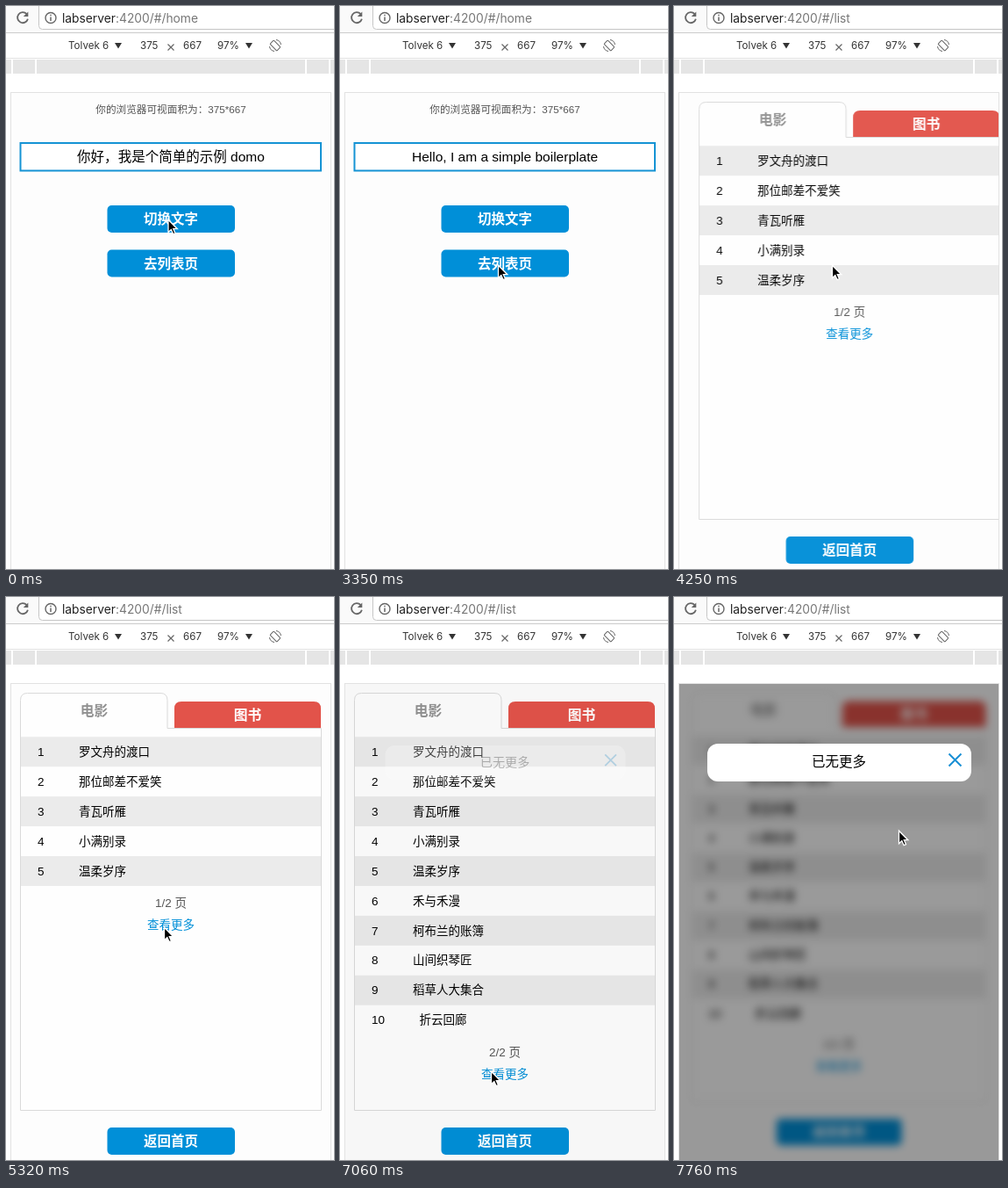
Recreate the animation shown at these times as an HTML page. Size 374 by 641 pixels, loop 8 s.

```html
<!DOCTYPE html>
<html lang="zh-CN">
<head>
<meta charset="utf-8">
<title>Page demo</title>
<style>
  html, body { margin: 0; width: 100%; height: 100%; overflow: hidden; background: #fff; }
  svg { display: block; width: 374px; height: 641px; }
  text { font-family: "Liberation Sans", "Noto Sans CJK SC", "Noto Sans CJK", sans-serif; white-space: pre; }
  .ui { font-family: Inter, Roboto, sans-serif; }
  .mid { text-anchor: middle; }
</style>
</head>
<body>
<svg viewBox="0 0 374 641">
  <defs>
    <clipPath id="view"><rect x="6" y="99" width="364" height="542"/></clipPath>
  </defs>

  <g id="chrome">
    <rect width="374" height="30" fill="#fafafa"/>
    <rect x="37.500" y="-8" width="360" height="34.500" rx="4" fill="#fff" stroke="#c6c6c6"/>
    <path d="M0 30.500H374" stroke="#ccc"/>
    <path d="M23.600 9.200A6 6 0 1 0 24.900 14.800" fill="none" stroke="#666" stroke-width="1.800"/>
    <path d="M25.300 6.500V12H19.800Z" fill="#666"/>
    <circle cx="51" cy="13.500" r="6" fill="none" stroke="#666" stroke-width="1.400"/>
    <path d="M51 12.500V17M51 9.800V11.300" stroke="#666" stroke-width="1.500"/>
    <text class="ui" x="64" y="18.500" font-size="13.800" fill="#222">labserver<tspan id="path" fill="#777"></tspan></text>
    <g font-size="11.600" fill="#333">
      <text class="ui" x="71" y="49">Tolvek 6</text>
      <text class="ui" x="153" y="49">375</text>
      <text class="ui" x="202" y="49">667</text>
      <text class="ui" x="241" y="49">97%</text>
      <path d="M124 42h8l-4 6.500zM273 42h8l-4 6.500z"/>
    </g>
    <path d="M184.500 43.500l7 7m0-7l-7 7" stroke="#666" stroke-width="1.200"/>
    <g fill="none" stroke="#666" transform="translate(307 45)">
      <rect x="-3" y="-5.500" width="6" height="11" rx="1" transform="rotate(-45)"/>
      <path d="M1-6.500A6.500 6.500 0 0 1 6.500-1M-1 6.500A6.500 6.500 0 0 1-6.500 1"/>
    </g>
    <path d="M0 59.500H374" stroke="#e2e2e2"/>
    <path d="M0 61h6v16h-6zM8 61h25v16h-25zM35 61h306v16h-306zM343 61h25v16h-25zM370 61h4v16h-4z" fill="#e5e5e5"/>
  </g>

  <rect x="5.500" y="98.500" width="365" height="560" fill="#fdfdfd" stroke="#e2e2e2"/>
  <g clip-path="url(#view)">
    <g id="home">
      <text class="mid" x="188" y="121.500" font-size="11.650" fill="#555">你的浏览器可视面积为&#xff1a;375*667</text>
      <rect x="16.500" y="156" width="342.500" height="31.500" fill="#fff" stroke="#1593d4" stroke-width="2"/>
      <text id="hello" class="mid" x="188" y="176.500" font-size="15.530"></text>
    </g>
    <g id="list">
      <path d="M16.500 584.500V117.500q0-8 8-8H176q8 0 8 8V149.500H359.500V584.500Z" fill="#fefefe" stroke="#dadada"/>
      <path d="M192 149V127q0-8 8-8H351q8 0 8 8V149Z" fill="#e2534a"/>
      <g class="mid" font-size="15.800" font-weight="700">
        <text x="100.500" y="135" fill="#919191">电影</text>
        <text x="275.500" y="140" fill="#fff">图书</text>
      </g>
      <g id="first"></g>
      <g id="more"></g>
      <g id="pager" class="mid" font-size="13.500">
        <text id="count" x="188" y="522.500" fill="#555"></text>
        <text x="188" y="548" fill="#008fd8">查看更多</text>
      </g>
    </g>
    <rect id="shade" x="6" y="99" width="364" height="542"/>
    <g id="modal">
      <rect x="38" y="167" width="301" height="43" rx="12" fill="#fff"/>
      <text class="mid" x="188" y="193" font-size="15.500">已无更多</text>
      <path d="M313.500 178.500l14 14m0-14l-14 14" stroke="#1a90d5" stroke-width="2"/>
    </g>
  </g>

  <g id="cursor">
    <path d="M.5.700V15.200l3.300-3.200 2.300 5.200 2.400-1-2.200-5H10.800Z" stroke="#fff" stroke-width="1.300"/>
  </g>
</svg>
<script>
const LOOP = 8000, PAGE_W = 365, ROW_H = 33.95;
const $ = id => document.getElementById(id);

function add(parent, tag, attrs, text = '') {
  const el = document.createElementNS('http://www.w3.org/2000/svg', tag);
  for (const key in attrs) el.setAttribute(key, attrs[key]);
  el.textContent = text;
  parent.append(el);
}

function button(parent, y, label) {
  add(parent, 'rect', { x: 115.5, y, width: 145.5, height: 31, rx: 5, fill: '#008fd8' });
  add(parent, 'text', { class: 'mid', x: 188, y: y + 21, 'font-size': 15.5, 'font-weight': 700, fill: '#fff' }, label);
}

button($('home'), 227, '切换文字');
button($('home'), 277.5, '去列表页');
button($('list'), 604, '返回首页');

const titles = ['罗文舟的渡口', '那位邮差不爱笑', '青瓦听雁', '小满别录', '温柔岁序',
  '禾与禾漫', '柯布兰的账簿', '山间织琴匠', '稻草人大集合', '折云回廊'];
titles.forEach((title, i) => {
  const group = $(i < 5 ? 'first' : 'more');
  const top = 159.2 + i * ROW_H;
  if (i % 2 === 0) add(group, 'rect', { x: 17, y: top, width: 342, height: ROW_H, fill: '#ebebeb' });
  const row = { y: top + 21.6, 'font-size': 13.5 };
  add(group, 'text', { ...row, x: 36 }, i + 1);
  add(group, 'text', { ...row, x: i < 9 ? 83 : 90.5 }, title);
});

// Number of held steps already shown, 0..n, between a and b.
function step(t, a, b, n) {
  if (t < a) return 0;
  return Math.min(n, 1 + Math.floor((t - a) / (b - a) * (n - 1) + 0.05));
}

// CSS "ease": cubic-bezier(.25, .1, .25, 1)
function ease(x) {
  if (x <= 0) return 0;
  if (x >= 1) return 1;
  const bez = (s, p, q) => 3 * s * (1 - s) ** 2 * p + 3 * s * s * (1 - s) * q + s ** 3;
  let lo = 0, hi = 1;
  for (let i = 0; i < 24; i++) {
    const m = (lo + hi) / 2;
    if (bez(m, 0.25, 0.25) < x) lo = m; else hi = m;
  }
  return bez(lo, 0.1, 1);
}

// start, end, steps, target x, target y, sideways bend
const moves = [
  [60, 120, 2, 187, 237.5, 0],
  [2990, 3350, 7, 180, 294.5, 0],
  [4900, 5320, 8, 180, 375.5, 0],
  [6160, 6640, 9, 172, 539.5, -13],
  [7590, 7760, 4, 256, 265.5, 0]
];

function cursorAt(t) {
  let x = 184.5, y = 242.5;
  for (const [a, b, n, tx, ty, bend] of moves) {
    const u = step(t, a, b, n) / n;
    const p = u * u * (3 - 2 * u);
    x += (tx - x) * p + bend * 4 * p * (1 - p);
    y += (ty - y) * p;
  }
  return `translate(${x} ${y})`;
}

// Modal entrance: shade, card opacity, card scale, blur, page scale
const entrance = [
  [0, 0, 0.9, 0, 1],
  [0.025, 0.25, 0.91, 0.2, 1],
  [0.085, 0.55, 0.94, 0.7, 0.999],
  [0.167, 0.8, 0.9635, 1.4, 0.997],
  [0.395, 1, 1, 5, 0.98]
];

const scaleAt = (x, y, s) => `translate(${x} ${y}) scale(${s}) translate(${-x} ${-y})`;

function draw(t) {
  const english = (t >= 480 && t < 1740) || t >= 2510;
  $('hello').textContent = english ? 'Hello, I am a simple boilerplate' : '你好\uff0c我是个简单的示例 domo';
  $('path').textContent = t < 3890 ? ':4200/#/home' : ':4200/#/list';

  const k = step(t, 3890, 4360, 9);
  const slide = k && ease((32 + (k - 1) * 58.75) / 500);
  $('home').setAttribute('transform', `translate(${-PAGE_W * slide} 0)`);
  $('home').setAttribute('opacity', (1 - slide) ** 2);

  const loaded = step(t, 5680, 5800, 3);
  $('more').setAttribute('opacity', [0, 0.5, 0.85, 1][loaded]);
  $('pager').setAttribute('transform', `translate(0 ${loaded ? 0 : -170})`);
  $('count').textContent = loaded ? '2/2 页' : '1/2 页';

  const [shade, alpha, card, blur, page] = entrance[step(t, 7060, 7230, 4)];
  $('shade').setAttribute('opacity', shade);
  $('modal').setAttribute('opacity', alpha);
  $('modal').setAttribute('transform', scaleAt(188.5, 188.5, card));
  $('list').setAttribute('transform', `translate(${PAGE_W * (1 - slide)} 0) ${scaleAt(188, 98, page)}`);
  $('list').setAttribute('opacity', slide);
  $('list').style.filter = blur ? `blur(${blur}px)` : 'none';

  $('cursor').setAttribute('transform', cursorAt(t));
}

const start = performance.now();
function tick() {
  draw((performance.now() - start) % LOOP);
  requestAnimationFrame(tick);
}
tick();
</script>
</body>
</html>
```
